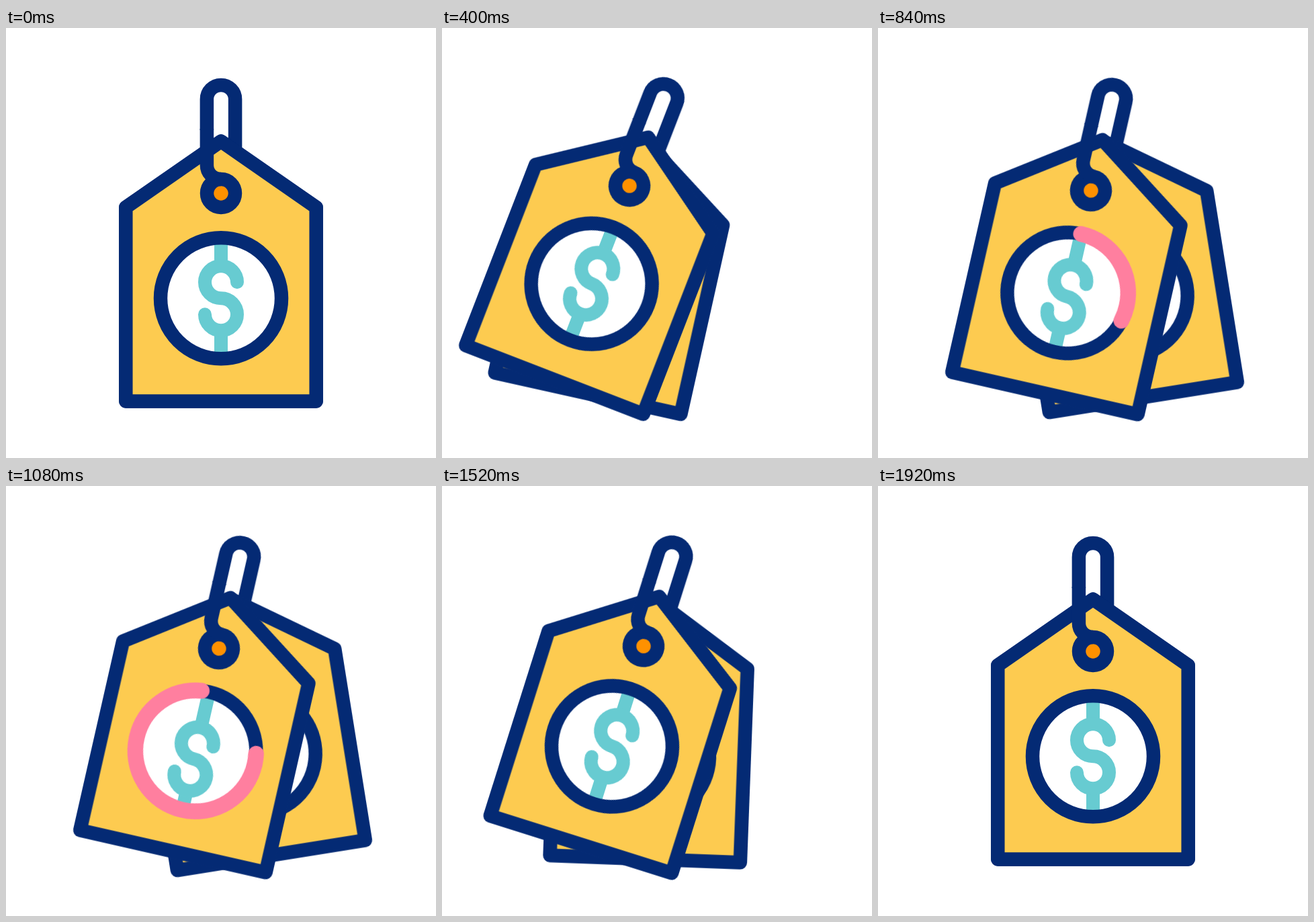
An HTML page that plays this animation: 640 by 640 pixels, repeating every 2000 ms.

```html
<!DOCTYPE html>
<html lang="en">
<head>
<meta charset="utf-8">
<title>Price tags</title>
<style>
  @property --from { syntax: "<length>"; inherits: false; initial-value: 0px; }
  @property --to { syntax: "<length>"; inherits: false; initial-value: 0px; }

  html, body { margin: 0; width: 100%; height: 100%; overflow: hidden; background: #fff; }
  svg { display: block; width: 100%; height: 100%; }

  .line { fill: none; stroke: #042a74; stroke-width: 20.5; stroke-linejoin: round; }
  .paper { fill: #fdcb50; }
  .coin { fill: #fff; }
  .hole { fill: #ff9100; }
  .sign { fill: none; stroke: #67cbd1; stroke-width: 20; }
  .arc { fill: none; stroke: #ff7f9f; stroke-width: 23.5; stroke-linecap: round; }

  .swing, .slide, .sign, .arc {
    animation: 2s cubic-bezier(.37, 0, .63, 1) infinite;
  }
  .swing { transform-origin: 320px 82px; }
  .back { animation-name: swing-back; transform-origin: 320.5px 82px; }
  .front { animation-name: swing-front; }
  .slide { animation-name: slide; }
  .front .sign { animation-name: dip; }
  .arc {
    animation-name: arc-to, arc-from, arc-show;
    stroke-dasharray: calc(var(--to) - var(--from)) 800px;
    stroke-dashoffset: calc(-1 * var(--from));
  }

  @keyframes swing-back {
    0%, 4.75%, 94.75%, 100% { transform: rotate(0deg); }
    19.25%, 82% { transform: rotate(12.7deg); }
    34%, 69.75% { transform: rotate(-9.1deg); }
  }
  @keyframes swing-front {
    0%, 4.75%, 94.75%, 100% { transform: rotate(0deg); }
    19.25%, 82% { transform: rotate(21.2deg); }
    34%, 69% { transform: rotate(12.8deg); }
  }
  @keyframes slide {
    0%, 4.25%, 95.75%, 100% { transform: translateX(0); }
    34%, 70.25% { transform: translateX(33.3px); }
  }
  @keyframes dip {
    0%, 34%, 69.3%, 100% { transform: translateY(0); }
    51.6% { transform: translateY(13px); }
  }
  @keyframes arc-to {
    0%, 34% { --to: 0px; }
    56%, 100% { --to: 360px; }
  }
  @keyframes arc-from {
    0%, 47% { --from: 0px; }
    69.3%, 100% { --from: 360px; }
  }
  @keyframes arc-show {
    0% { opacity: 0; animation-timing-function: step-end; }
    34.2% { opacity: 1; animation-timing-function: step-end; }
    69.3%, 100% { opacity: 0; }
  }
</style>
</head>
<body>
<svg viewBox="0 0 640 640">
  <defs>
    <g id="tag">
      <path class="line paper" d="M320 168.7 461.7 267V555.5H178.3V267Z"/>
      <circle class="coin" cx="320" cy="402.3" r="90"/>
    </g>
    <circle id="ring" class="line" cx="320" cy="402.3" r="90"/>
  </defs>

  <!-- cord behind the tags -->
  <g class="slide"><g class="swing front">
    <path class="line" d="M298.9 152V106a21.1 21.1 0 0 1 42.2 0V180"/>
  </g></g>

  <g class="swing back">
    <use href="#tag"/>
    <use href="#ring"/>
  </g>

  <g class="slide"><g class="swing front">
    <use href="#tag"/>
    <path class="sign" d="M320 307V354M320 450V486"/>
    <path class="sign" stroke-linecap="round"
      d="M344 378.3a24 24 0 0 0-48 0a24 24 0 0 0 24 24a24 24 0 0 1 24 24a24 24 0 0 1-48 0"/>
    <use href="#ring"/>
    <path class="arc" pathLength="360" d="M320 312.3a90 90 0 0 1 0 180a90 90 0 0 1 0-180"/>
    <circle class="hole" cx="320" cy="246" r="20"/>
    <circle class="line" cx="320" cy="246" r="21"/>
    <path class="line" d="M298.9 150V204C298.9 216 308 225 320 225"/>
  </g></g>
</svg>
<script>
  // Advance the keyframes at 25 pictures per second.
  const STEP = 40, LOOP = 2000, LEAD = 8;
  const start = performance.now();
  const moves = document.getAnimations();
  moves.forEach(m => m.pause());

  function tick() {
    const t = (performance.now() - start + LEAD) % LOOP;
    const time = Math.floor(t / STEP) * STEP;
    moves.forEach(m => { m.currentTime = time; });
    requestAnimationFrame(tick);
  }
  tick();
</script>
</body>
</html>
```
